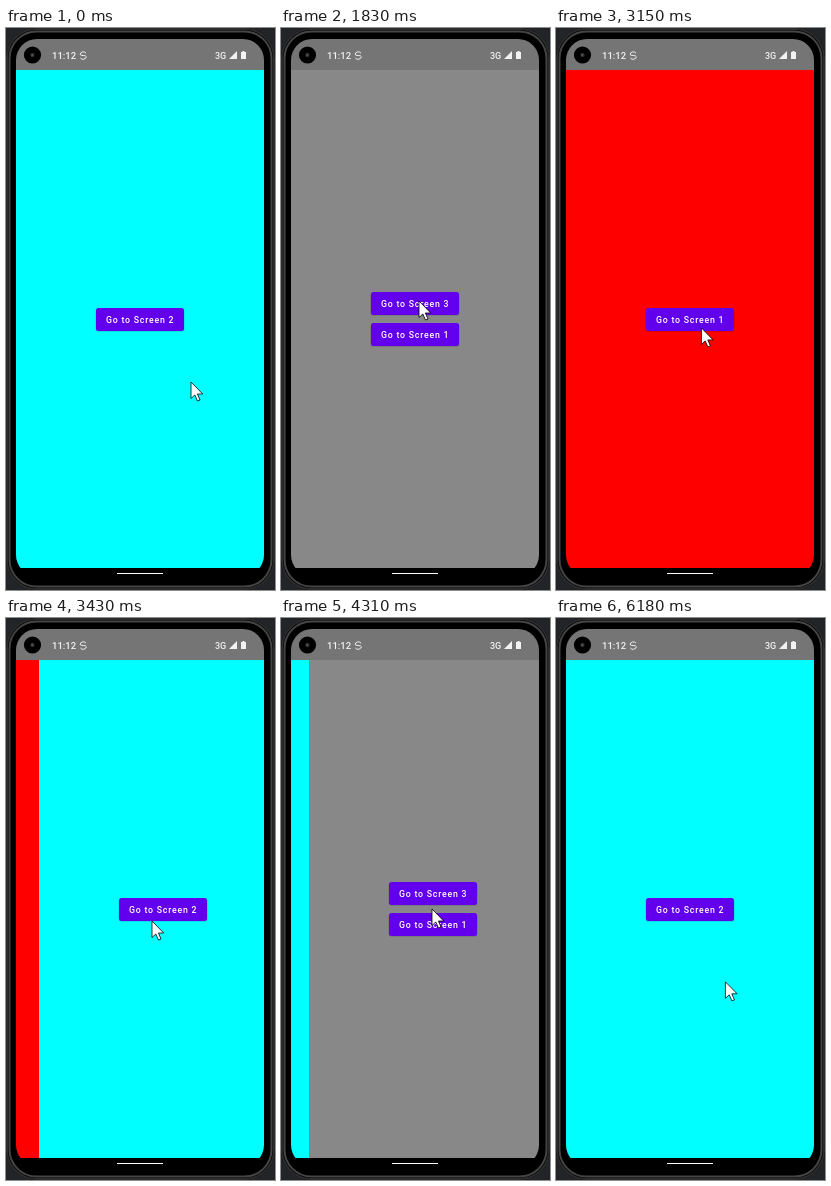
An HTML page that plays this animation: 269x562 px, repeating every 6.91 s.

```html
<!DOCTYPE html>
<html lang="en">
<head>
<meta charset="utf-8">
<title>Screen navigation</title>
<style>
  html, body { margin: 0; width: 100%; height: 100%; overflow: hidden; background: #222427; }
  svg { display: block; width: 269px; height: 562px; }
  text { font-family: Roboto, "Noto Sans", sans-serif; font-weight: 500; fill: #fff; }
  .label { font-size: 8.75px; letter-spacing: .78px; white-space: pre; }
  .button { fill: #6200ee; }
  .shadow { fill: #000; opacity: .16; }
  .status { fill: #f2f2f2; }
  .rim { fill: none; stroke-width: 2; }
</style>
</head>
<body>
<svg viewBox="0 0 269 562">
  <defs>
    <clipPath id="display"><rect x="10" y="11" width="248" height="537" rx="21"/></clipPath>
    <clipPath id="content"><rect x="10" y="42" width="248" height="498"/></clipPath>
  </defs>

  <!-- phone body -->
  <rect width="269" height="562" rx="30"/>
  <rect class="rim" x="1" y="1" width="267" height="560" rx="29" stroke="#2c2c2c"/>
  <rect class="rim" x="3.5" y="3.5" width="262" height="555" rx="27" stroke="#454545"/>

  <g clip-path="url(#display)">
    <rect x="10" y="11" width="248" height="31" fill="#757575"/>
    <g id="screens" clip-path="url(#content)"></g>
  </g>
  <rect x="111" y="545" width="46" height="1" fill="#fff"/>

  <!-- status bar -->
  <circle cx="26.5" cy="27" r="8.6"/>
  <circle cx="26.5" cy="27" r="2.2" fill="#2c2c2c"/>
  <circle cx="26.2" cy="27" r=".8" fill="#777"/>
  <text class="status" x="46" y="31" font-size="9.5">11:12</text>
  <path d="M80 25.2A3.4 3.4 0 0 0 74 26.3Q74.4 27.5 77.2 27.5T80.4 28.8A3.4 3.4 0 0 1 74.4 30" fill="none" stroke="#f2f2f2"/>
  <text class="status" x="209" y="30.6" font-size="9">3G</text>
  <path class="status" d="M231 23V31H223Z"/>
  <path class="status" d="M236.5 23h2v1h1.5v7h-5v-7h1.5z"/>

  <path id="cursor" d="M0 0V16.5L3.8 13L6.5 19L9 18L6.4 12H11.7Z" fill="#fff" stroke="#000" stroke-width=".8" stroke-linejoin="round"/>
</svg>

<script>
const LOOP = 6910, STEP = 70, WIDTH = 248, SLIDE = 370, EXIT = 5760;
const $ = id => document.getElementById(id);

const button = (n, y) =>
  `<rect class="shadow" x="89.5" y="${y + .8}" width="89" height="23" rx="3"/>
   <rect class="button" x="90" y="${y}" width="88" height="23" rx="2.5"/>
   <text class="label" x="100" y="${y + 15}">Go to Screen ${n}</text>`;

const screens = [
  ['#0ff', button(2, 280)],
  ['#888', button(3, 264) + button(1, 295)],
  ['#f00', button(1, 280)],
].map(([color, buttons]) => {
  const g = document.createElementNS('http://www.w3.org/2000/svg', 'g');
  g.innerHTML = `<rect x="10" y="42" width="${WIDTH}" height="498" fill="${color}"/>${buttons}`;
  return $('screens').appendChild(g);
});

// Each tap opens a screen after a short delay, from the right (1) or left (-1)
const taps = [
  { at: 0, delay: -SLIDE, to: 0, side: 1 },
  { at: 1130, delay: 135, to: 1, side: 1 },
  { at: 2160, delay: 142, to: 2, side: 1 },
  { at: 3080, delay: 112, to: 0, side: 1 },
  { at: 3960, delay: 100, to: 1, side: 1 },
  { at: 4720, delay: 112, to: 0, side: -1 },
];

// Pointer moves: start, end, x, y
const moves = [
  [0, 200, 138, 295],
  [650, 730, 136, 293],
  [1480, 1750, 138, 273],
  [2300, 2510, 140, 272],
  [2700, 3200, 146, 303],
  [3500, 3850, 151, 291],
  [4400, 4650, 148, 308],
];

const clamp = k => Math.min(1, Math.max(0, k));

// cubic-bezier(.4, 0, .2, 1), solved by bisection
function ease(x) {
  let lo = 0, hi = 1;
  for (let i = 0; i < 24; i++) {
    const s = (lo + hi) / 2, r = 1 - s;
    if (1.2 * s * r * r + .6 * s * s * r + s * s * s < x) lo = s; else hi = s;
  }
  return lo * lo * (3 - 2 * lo);
}

function pointer(t) {
  let x = 185, y = 354;
  for (const [start, end, toX, toY] of moves) {
    const k = clamp((t - start) / (end - start));
    x += (toX - x) * k;
    y += (toY - y) * k;
  }
  // swing up, then out through the bottom edge
  const k = clamp((t - EXIT) / 420);
  return [x - 185 * k + 245 * k * k, y - 1116 * k + 1378 * k * k];
}

function place(node, x) {
  node.style.display = Math.abs(x) < WIDTH ? '' : 'none';
  node.setAttribute('transform', `translate(${x} 0)`);
}

function draw(time) {
  const i = taps.findLastIndex(tap => tap.at <= time);
  const { at, delay, to, side } = taps[i];
  const from = i ? taps[i - 1].to : -1;

  // the picture advances in even steps after each tap
  const t = at + Math.floor((time - at) / STEP) * STEP;
  const left = Math.round(WIDTH * (1 - ease(clamp((t - at - delay) / SLIDE))));
  screens.forEach((screen, n) =>
    place(screen, n === to ? side * left : n === from ? side * (left - WIDTH) : WIDTH));

  const [x, y] = pointer(t);
  $('cursor').setAttribute('transform', `translate(${x.toFixed(1)} ${y.toFixed(1)})`);
}

const origin = performance.now();
function tick() {
  draw((performance.now() - origin) % LOOP);
  requestAnimationFrame(tick);
}
tick();
</script>
</body>
</html>
```
